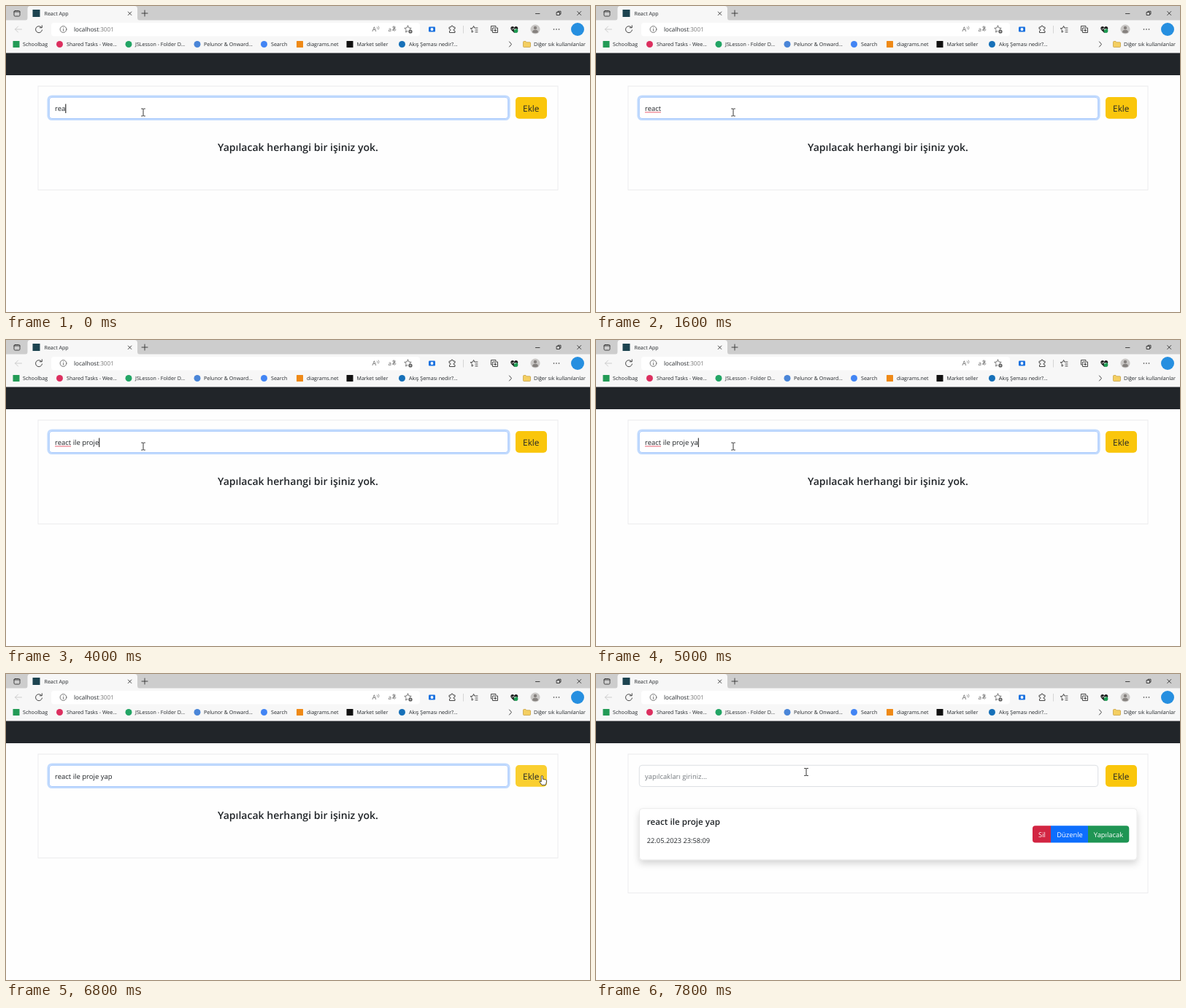
Recreate the animation shown at these times as an HTML page. Size 800 px wide and 420 px high, loop 8000 ms.

```html
<!DOCTYPE html>
<html lang="tr">
<head>
<meta charset="utf-8">
<title>React App</title>
<style>
  html, body { margin: 0; width: 100%; height: 100%; overflow: hidden; background: #fefefe; }
  svg { display: block; font: 9.5px "Open Sans", "Noto Sans", sans-serif; text-rendering: geometricPrecision; }
  text { fill: #212529; white-space: pre; }
  .small { font-size: 7.1px; }
  .strong { font-weight: 600; }
  .line { fill: none; stroke: #333; stroke-width: .9; stroke-linecap: round; stroke-linejoin: round; }
  .white text { fill: #fff; font-size: 9.4px; text-anchor: middle; }
</style>
</head>
<body>
<svg width="800" height="420" viewBox="0 0 800 420">
  <defs>
    <filter id="shadow" x="-10%" y="-30%" width="120%" height="180%">
      <feDropShadow dx="0" dy="5" stdDeviation="5" flood-opacity=".16"/>
    </filter>
  </defs>

  <!-- Tab strip -->
  <rect width="800" height="20" fill="#cdcdcd"/>
  <rect y="19.5" width="800" height="45.5" fill="#f7f7f7"/>
  <path d="M26 20q3.500 0 3.500-4V4q0-4 4-4h142.500q4 0 4 4v12q0 4 3.500 4z" fill="#f7f7f7"/>
  <rect x="11" y="6.500" width="8" height="7.500" rx="1.500" class="line"/>
  <path d="M11 8h8" class="line" stroke-width="2"/>
  <rect x="36.500" y="5" width="10" height="10" fill="#1d4450"/>
  <text x="52.500" y="12.700" class="small">React App</text>
  <path class="line" d="M167.300 8l4.500 4.500m0-4.500l-4.500 4.500M186 10h8m-4-4v8M725.500 10.500h5.500M754.500 8.500h4v4h-4zM756 8.500v-1.300h4v4h-1.500M782.700 7.500l5 5m0-5l-5 5"/>

  <!-- Toolbar -->
  <path class="line" style="stroke:#c8c8c8" d="M21.500 32h-9m4-4l-4 4 4 4"/>
  <path class="line" d="M48.700 29.500a4.500 4.500 0 1 0 .8 3.500M49.300 26.800v3h-3"/>
  <rect x="62" y="23" width="505" height="18.500" rx="4" fill="#fff"/>
  <g class="line" style="stroke:#555;stroke-width:.8">
    <circle cx="78.500" cy="32" r="4.400"/>
    <path d="M78.500 31.700v2.500M78.500 29.800v.1"/>
  </g>
  <text x="93" y="34.900" font-size="8.150">localhost<tspan fill="#777">:3001</tspan></text>
  <text x="501.500" y="35.300" font-size="9" style="fill:#666">A</text>
  <path class="line" style="stroke:#777;stroke-width:.7" d="M508.500 29q1 1.300 0 2.500M510.300 27.800q1.800 2.200 0 4.500"/>
  <text x="523.500" y="34.500" font-size="8" style="fill:#666">a</text>
  <path class="line" style="stroke:#666;stroke-width:.7" d="M529.500 29h4m-2.200-1.500v6.500m1.500-4.500q-1 4-3 4.200-1.300-1 .5-2.200 3-1.200 3.700.8-.2 1.500-1.500 1.900"/>
  <path class="line" style="stroke:#666" d="M550.500 27l1.400 3 3.300.4-2.400 2.200M550.500 27l-1.400 3-3.300.4 2.400 2.300-.6 3.300 2.600-1.500"/>
  <circle cx="554" cy="35" r="2.600" fill="#555"/>
  <path d="M552.700 35h2.600m-1.300-1.300v2.600" stroke="#fff" stroke-width=".6"/>
  <rect x="579" y="28.500" width="9" height="7" rx="1.300" fill="#1b72e0"/>
  <circle cx="583.500" cy="32" r="1.900" fill="#fff"/>
  <path class="line" d="M607.500 29h2q0-2 1.500-2t1.500 2h2.500v2.500q-2 0-2 1.300t2 1.400v2.300h-7.500v-2.300q1.500 0 1.500-1.400t-1.500-1.300z"/>
  <path d="M626.500 27v10.500" stroke="#ccc" stroke-width=".8"/>
  <path class="line" d="M640 35l-2 1.100.5-3.200-2.300-2.200 3.100-.4 1.300-2.800 1.200 2.600h4.200M643 33h3M643 35.800h3"/>
  <path class="line" d="M665.500 34h-1v-6.500h6.500v1.200M667 30h6.500v6.500H667zM670.200 31.700v3.200m-1.600-1.600h3.200"/>
  <path d="M696.300 37l-4.300-4.300q-1.800-3 .8-4.500 2-.8 3.500 1.200 1.500-2 3.500-1.200 2.600 1.500.8 4.500z" fill="#222"/>
  <circle cx="698.500" cy="34" r="2.900" fill="#1d9b52"/>
  <path d="M692.500 31.700h2l1-1.500 1.300 2.800 1-1.300h1.500" fill="none" stroke="#f7f7f7" stroke-width=".7"/>
  <circle cx="725" cy="32" r="6.500" fill="#c9c7c5"/>
  <circle cx="725" cy="30" r="2.200" fill="#85817e"/>
  <path d="M721 36.200q0-3.400 4-3.400t4 3.400q-4 2.300-8 0z" fill="#85817e"/>
  <g fill="#333"><circle cx="750.500" cy="32" r=".8"/><circle cx="754" cy="32" r=".8"/><circle cx="757.500" cy="32" r=".8"/></g>
  <circle cx="783" cy="32" r="9" fill="#268fe0"/>

  <!-- Bookmarks -->
  <g id="bookmarks" class="small"></g>
  <path class="line" d="M689.500 49l3 3.500-3 3.500"/>
  <path d="M708.500 49.500q0-1 1-1h2.500l1.200 1.300h4.300q1 0 1 1v4.700q0 1-1 1h-8q-1 0-1-1z" fill="#f4cf62" stroke="#b98d25" stroke-width=".6"/>
  <text x="723" y="55" class="small">Diğer sık kullanılanlar</text>

  <!-- Page -->
  <rect y="64.500" width="800" height="30.500" fill="#212529"/>
  <rect id="panel" x="44" y="110" width="712" fill="none" stroke="#ececee"/>
  <rect id="ring" x="57.700" y="123.700" width="631.600" height="32.100" rx="5" fill="none" stroke="#c2dbfe" stroke-width="2.600"/>
  <rect id="input" x="59.300" y="125.300" width="628.400" height="29.200" rx="3.700" fill="#fff" stroke-width=".8"/>
  <text id="typed" x="67" y="144"></text>
  <path id="squiggle" fill="none" stroke="#e5384d" stroke-width=".8"/>
  <rect id="caret" y="134.500" width="1" height="12.500" fill="#111"/>
  <rect id="add" x="698" y="125" width="43" height="29.700" rx="4.800"/>
  <text x="719.300" y="144.800" font-size="11.800" text-anchor="middle">Ekle</text>
  <text id="empty" x="400" y="199.300" font-size="14.050" class="strong" text-anchor="middle">Yapılacak herhangi bir işiniz yok.</text>

  <g id="card">
    <text x="67" y="144" font-size="9.400" style="fill:#74797e">yapılcakları giriniz...</text>
    <rect x="59.500" y="184.700" width="681.500" height="70.300" rx="4" fill="#fff" stroke="#e2e2e3" stroke-width=".7" filter="url(#shadow)"/>
    <text x="69.800" y="207.300" font-size="11.650" class="strong">react ile proje yap</text>
    <text x="69.800" y="231.500" font-size="9.250">22.05.2023 23:58:09</text>
    <g class="white">
      <path d="M623 208.300h-21.200q-3.800 0-3.800 3.800v15.700q0 3.800 3.800 3.800H623z" fill="#d22542"/>
      <path d="M623 208.300h51v23.300h-51z" fill="#0d6efd"/>
      <path d="M674 208.300h52.500q3.800 0 3.800 3.800v15.700q0 3.800-3.800 3.800H674z" fill="#1f9554"/>
      <text x="611" y="223.500">Sil</text>
      <text x="649" y="223.500">Düzenle</text>
      <text x="702" y="223.500">Yapılacak</text>
    </g>
  </g>

  <!-- Pointers -->
  <path id="beam" class="line" style="stroke:#222;stroke-linecap:butt" d="M-2.800-5h2.200l.6.600.6-.600h2.200M0-4.500v9M-2.800 5h2.200l.6-.600.6.600h2.200"/>
  <path id="arrow" d="M0 0v9.600l2.300-2.100 1.600 3.500 1.500-.7-1.600-3.400h3.100z" fill="#fff" stroke="#333" stroke-width=".7"/>
  <path id="hand" d="M-1.100 .3q1.100-1.300 2.200 0v4.200l4 .8q1.300.4 1.200 1.800l-.6 3.200-1 2.300h-5l-3-4.300q-.4-1.300.8-1.200l1.400 1.200z" fill="#fff" stroke="#222" stroke-width=".8" stroke-linejoin="round"/>
</svg>
<script>
const LOOP = 8000, STEP = 200, BLINK = 530, PRESS = 6800, ADDED = 7000;
const TASK = 'react ile proje yap';

// Moment each character after "rea" is typed
const keyTimes = [200, 600, 800, 1800, 2000, 2200, 2400, 3000, 3200, 3600, 3800, 4000, 4200, 4800, 5000, 5400];
const pointerPath = [
  [0, 'beam', 188, 146], [5800, 'arrow', 300, 168], [6000, 'arrow', 590, 191],
  [6200, 'arrow', 762.7, 133.300], [6600, 'arrow', 750, 136], [6800, 'hand', 734.300, 139.800],
  [7200, 'arrow', 600, 165], [7400, 'arrow', 330, 215], [7800, 'beam', 288, 134.500]
];
const bookmarks = [
  [14, 23, '#239b56', 'square', 'Schoolbag'],
  [73.500, 83, '#dc2f5f', 'circle', 'Shared Tasks - Wee...'],
  [168, 177, '#22a565', 'circle', 'JSLesson - Folder D...'],
  [262, 271, '#4a86d8', 'circle', 'Pelunor & Onward...'],
  [353.500, 363, '#4285f4', 'circle', 'Search'],
  [402.500, 412, '#ef8a17', 'square', 'diagrams.net'],
  [471, 480.500, '#111', 'square', 'Market seller'],
  [542.500, 552, '#1670b8', 'circle', 'Akış Şeması nedir?...']
];

const $ = id => document.getElementById(id);
const show = (id, on) => $(id).setAttribute('visibility', on ? 'visible' : 'hidden');
const set = (id, name, value) => $(id).setAttribute(name, value);

$('bookmarks').innerHTML = bookmarks.map(([cx, x, color, shape, label]) =>
  `<rect x="${cx - 4.500}" y="48" width="9" height="9" rx="${shape === 'circle' ? 4.500 : 0.500}" fill="${color}"/>
   <text x="${x}" y="55">${label.replace('&', '&amp;')}</text>`).join('');

let wave = 'M67 146.300';
for (let i = 0; i < 11; i++) wave += 'l1-.8l1 .8';
set('squiggle', 'd', wave);

function render(time) {
  const t = Math.floor(time / STEP) * STEP;
  const typedKeys = keyTimes.filter(k => k <= t);
  const added = t >= ADDED, focused = t < PRESS;
  const sinceKey = t - (typedKeys.at(-1) ?? 0);

  $('typed').textContent = added ? '' : TASK.slice(0, 3 + typedKeys.length);
  set('caret', 'x', 67 + $('typed').getComputedTextLength());
  show('caret', focused && sinceKey % (2 * BLINK) < BLINK);
  show('squiggle', focused && typedKeys.length > 2);
  show('ring', !added);
  set('input', 'stroke', added ? '#d5d9de' : '#93bdfd');
  show('empty', !added);
  show('card', added);
  set('panel', 'height', added ? 190.500 : 142.500);

  const [, kind, x, y] = pointerPath.findLast(p => p[0] <= t);
  for (const id of ['beam', 'arrow', 'hand']) show(id, id === kind);
  set(kind, 'transform', `translate(${x} ${y})`);
  set('add', 'fill', kind === 'hand' ? '#facf30' : '#fac60c');
}

function tick() {
  render(performance.now() % LOOP);
  requestAnimationFrame(tick);
}
tick();
</script>
</body>
</html>
```
